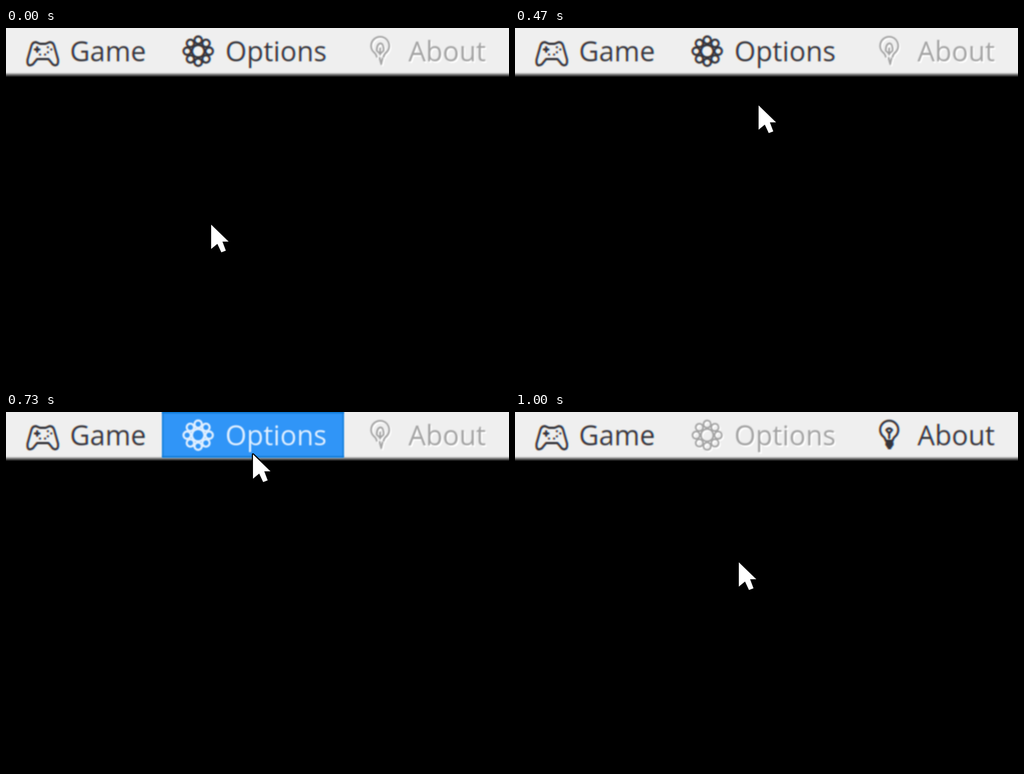
These frames come from a looping animation (890 by 630 pixels, 1070 ms). An HTML page with a canvas:

```html
<!DOCTYPE html>
<html lang="en">
<head>
<meta charset="utf-8">
<title>Menu bar</title>
<style>
html, body { margin: 0; height: 100%; overflow: hidden; background: #000; }
canvas { display: block; }
</style>
</head>
<body>
<canvas id="stage" width="890" height="630"></canvas>
<script>
const ctx = document.getElementById('stage').getContext('2d');
const LOOP = 1070, HOVER = 530, PRESS = 800, SWITCH = 870;

// Pointer steps: start time, x, y
const steps = [
  [0, 363, 348], [70, 364, 348], [140, 366, 346], [200, 369, 342],
  [270, 383, 306], [340, 402, 251], [400, 418, 195], [470, 431, 137],
  [530, 437, 77], [600, 437, 75], [870, 435, 84], [930, 420, 152],
  [1000, 396, 266]
];

const gamepad = new Path2D(`M45 31Q47 25 53 25L60 28H70L77 25Q83 25 85 31L92 56
  Q93 66 87 66Q83 66 80 61L75 55H55L50 61Q47 66 42 66Q37 66 38 56Z
  M51 38h8M55 34v8M74 34h.1M80 38h.1M74 43h.1M60 47h.1M69 47h.1`);

const gear = new Path2D();
function ring(x, y, r) {
  gear.moveTo(x + r, y);
  gear.arc(x, y, r, 0, Math.PI * 2);
}
ring(340, 41, 11);
for (let i = 0; i < 8; i++) {
  const a = i * Math.PI / 4;
  ring(340 + 19.5 * Math.cos(a), 41 + 19.5 * Math.sin(a), 6.5);
}

const head = 'M656 51Q655 46 650 42A16 16 0 1 1 674 42Q669 46 668 51';
const bulb = new Path2D(head + 'ZM657 55H668M657 58H668M659 61H666M661 64H664' +
  'M662 46V38L657 32Q662 26 667 32L662 38');
const dimBulb = new Path2D(head + 'M662 46L656 40Q656 28 663 27Q669 29 668 40L662 46' +
  'M662 36V47M661 53L664 64L666 54');

function put(icon, label, x, color, dx = 0, dy = 0) {
  ctx.save();
  ctx.translate(dx, dy);
  ctx.fillStyle = ctx.strokeStyle = color;
  ctx.stroke(icon);
  ctx.fillText(label, x, 59);
  ctx.restore();
}

function item(icon, label, x, look) {
  ctx.save();
  ctx.filter = 'blur(1.1px)';
  ctx.font = '48.6px "Open Sans", "Noto Sans", sans-serif';
  ctx.lineWidth = look === 'off' ? 3 : 3.8;
  ctx.lineCap = ctx.lineJoin = 'round';
  if (look === 'hot') {
    put(icon, label, x, '#e0efff');
  } else if (look === 'off') {
    put(icon, label, x, '#fff', 2.6, 2.6);
    put(icon, label, x, '#a4a4a4');
  } else {
    // Subpixel colour fringes
    ctx.globalCompositeOperation = 'multiply';
    put(icon, label, x, 'rgb(255,255,62)', -0.9);
    put(icon, label, x, 'rgb(255,56,255)');
    put(icon, label, x, 'rgb(56,255,255)', 0.9);
  }
  ctx.restore();
}

function bar() {
  const edge = ctx.createLinearGradient(0, 77, 0, 87);
  [[0, '#efefef'], [0.2, '#e4e4e4'], [0.5, '#888'], [0.7, '#4c4c4c'], [1, '#000']]
    .forEach(([at, color]) => edge.addColorStop(at, color));
  ctx.fillStyle = edge;
  ctx.fillRect(0, 0, 890, 87);
}

function highlight() {
  ctx.save();
  ctx.filter = 'blur(0.8px)';
  ctx.fillStyle = '#3095f7';
  ctx.fillRect(276.5, -4, 321, 84.5);
  ctx.fillStyle = '#0b78d4';
  ctx.fillRect(276.5, -4, 321, 6.5);
  ctx.fillRect(276.5, 78, 321, 2.5);
  ctx.fillRect(276.5, 0, 2, 80);
  ctx.fillRect(595.5, 0, 2, 80);
  ctx.restore();
}

const arrow = new Path2D('M0 0L31 30H20L26 46L18 49L11 34L0 43Z');
function pointer(x, y) {
  ctx.save();
  ctx.translate(x, y);
  ctx.filter = 'blur(0.7px)';
  ctx.lineWidth = 4;
  ctx.lineJoin = 'round';
  ctx.strokeStyle = '#000';
  ctx.stroke(arrow);
  ctx.fillStyle = '#fff';
  ctx.fill(arrow);
  ctx.restore();
}

function draw(now) {
  const t = now % LOOP;
  const hot = t >= HOVER && t < PRESS, swapped = t >= SWITCH;
  ctx.fillStyle = '#000';
  ctx.fillRect(0, 0, 890, 630);
  bar();
  if (hot) highlight();
  item(gamepad, 'Game', 113, 'on');
  item(gear, 'Options', 388, hot ? 'hot' : swapped ? 'off' : 'on');
  item(swapped ? bulb : dimBulb, 'About', 712, swapped ? 'on' : 'off');
  const [, x, y] = steps.findLast(s => s[0] <= t);
  pointer(x, y);
}

const start = performance.now();
function tick() {
  draw(performance.now() - start);
  requestAnimationFrame(tick);
}
tick();
</script>
</body>
</html>
```
